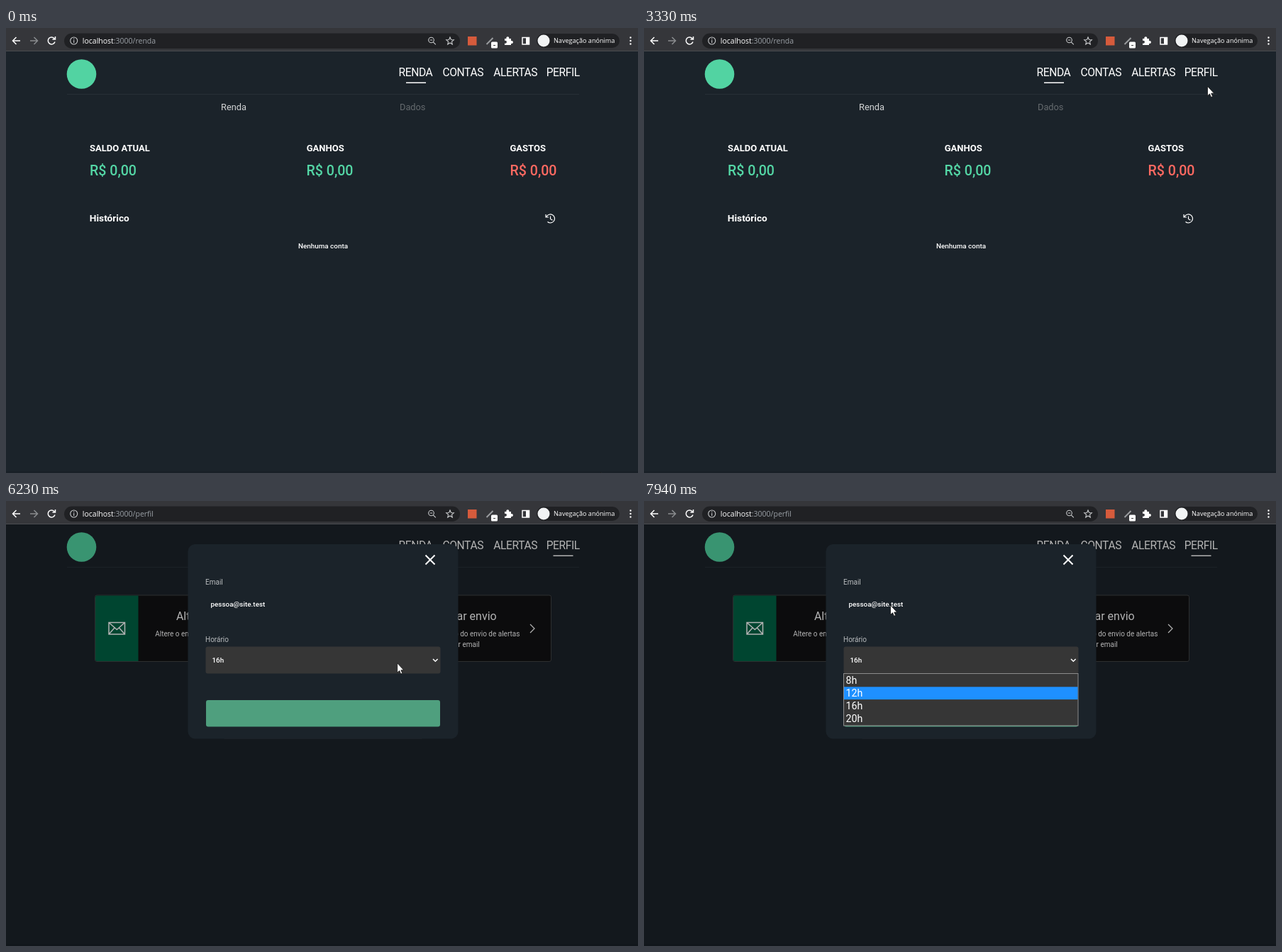
An HTML page that plays this animation: 891x628 px, repeating every 8 s.

```html
<!DOCTYPE html>
<html lang="pt">
<head>
<meta charset="utf-8">
<style>
html, body { margin: 0; width: 100%; height: 100%; overflow: hidden; background: #1b232a; }
svg { display: block; width: 891px; height: 628px; font-family: Roboto, sans-serif; fill: #fff; }
text { white-space: pre; }
.ui { font-family: "Open Sans", "Noto Sans", sans-serif; }
.nav { font-size: 15.6px; letter-spacing: -.4px; }
.label { font-size: 13px; font-weight: 700; }
.money { font-size: 19.6px; font-weight: 500; fill: #54d6a5; }
.small { font-size: 10px; }
.firm { font-weight: 500; font-size: 9.9px; }
.mid { text-anchor: middle; }
.line { fill: none; stroke: #fff; stroke-width: 1.5; }
</style>
</head>
<body>
<svg viewBox="0 0 891 628">
  <defs>
    <path id="chevron" class="line" d="M0 0l6 6-6 6" style="stroke-width:1.2"/>
    <g id="card">
      <rect x=".5" y=".5" width="282" height="93.500" rx="2.500" fill="#111113" stroke="#414345"/>
      <path d="M1 3q0-2 2-2H61.500V93.500H3q-2 0-2-2Z" fill="#006245"/>
      <use href="#chevron" x="253" y="41.500"/>
    </g>
  </defs>

  <rect width="891" height="628" fill="#1b232a"/>
  <rect y="625" width="891" height="3" fill="#192027"/>

  <!-- site header -->
  <circle cx="106.500" cy="65" r="20.800" fill="#52d3a2"/>
  <path d="M86 93.500H808" stroke="#272f36"/>
  <g class="nav">
    <text x="553.500" y="67.700">RENDA</text>
    <text x="615.500" y="67.700">CONTAS</text>
    <text x="687.300" y="67.700">ALERTAS</text>
    <text x="761.700" y="67.700">PERFIL</text>
  </g>
  <rect id="underline" y="76.500" width="28" height="1.500"/>

  <g id="income">
    <g font-size="12.800">
      <text x="303" y="115.500" fill="#d3d5d6">Renda</text>
      <text x="555" y="115.500" fill="#656a6e">Dados</text>
    </g>
    <g class="label">
      <text x="118" y="174.300">SALDO ATUAL</text>
      <text x="423.700" y="174.300">GANHOS</text>
      <text x="710.500" y="174.300">GASTOS</text>
      <text x="117.800" y="273" font-size="13.700" style="font-size:13.700px">Histórico</text>
    </g>
    <g class="money">
      <text x="118" y="208">R$ 0,00</text>
      <text x="423.500" y="208">R$ 0,00</text>
      <text x="710.500" y="208" style="fill:#ff6961">R$ 0,00</text>
    </g>
    <path class="line" d="M762 266.500A6 6 0 1 1 763.500 273.500M761 263v4h4M767.500 265.500v4l3 1.800" style="stroke-width:1.2"/>
    <text class="firm mid" x="447" y="310.500">Nenhuma conta</text>
  </g>

  <g id="profile">
    <use href="#card" x="125" y="132.500"/>
    <use href="#card" x="486" y="132.500"/>
    <use href="#card" x="305.500" y="241"/>
    <g class="mid" font-size="16">
      <text x="285" y="167.500">Alterar email</text>
      <text x="647" y="167.500">Alterar envio</text>
      <text x="466" y="276">Alterar senha</text>
    </g>
    <g class="small mid">
      <text x="285.500" y="190.500">Altere o endereço de email da sua</text>
      <text x="285.500" y="206">conta</text>
      <text x="647" y="190.500">Altere o horário do envio de alertas</text>
      <text x="647" y="206">por email</text>
      <text x="466" y="299.500">Altere a senha da sua conta</text>
    </g>
    <g class="line">
      <path d="M145 171.500H167.500V188H145ZL156.300 181.500 167.500 171.500M145 188L153 179M167.500 188L159.500 179"/>
      <circle cx="517.500" cy="180" r="8"/>
      <path d="M513 173l1-5h7l1 5M513 187l1 5h7l1-5M517.500 175v5h4"/>
      <path d="M327.500 283.500H347.500V298.500H327.500ZM332.500 283.500v-3a5 5 0 0 1 10 0v3"/>
    </g>
  </g>

  <g id="modal">
    <rect y="33" width="891" height="595" fill="#000" opacity=".3"/>
    <rect x="256.500" y="61" width="381" height="274.500" rx="10" fill="#1b232a"/>
    <path class="line" d="M591.500 76.500l13 13m0-13l-13 13" style="stroke-width:2"/>
    <g class="small">
      <text x="281" y="117.500" fill="#b9bcbe">Email</text>
      <text x="281" y="198.500" fill="#b9bcbe">Horário</text>
      <text class="firm" x="288.500" y="148.500">pessoa@site.test</text>
    </g>
    <rect x="282" y="281" width="330" height="37.500" rx="3" fill="#4f9f7e"/>
    <rect x="281.500" y="205.500" width="331" height="38" rx="3" fill="#363636"/>
    <text class="firm" x="290.500" y="228">16h</text>
    <path class="line" d="M602 223l3.300 3.300 3.300-3.300"/>
    <g id="menu">
      <rect x="281.500" y="243.500" width="330.500" height="73.500" fill="#363636" stroke="#8c8c8c"/>
      <rect id="choice" x="282" width="329.500" height="17.800" fill="#1e90ff"/>
      <g font-size="14.200">
        <text x="284.500" y="258">8h</text>
        <text x="284.500" y="276">12h</text>
        <text x="284.500" y="293.500">16h</text>
        <text x="284.500" y="311.500">20h</text>
      </g>
    </g>
  </g>

  <!-- browser bar -->
  <g class="ui">
    <rect width="891" height="33" fill="#35363a"/>
    <rect y="32" width="891" height="1" fill="#4a4c50"/>
    <rect x="82" y="7.500" width="558" height="21.500" rx="10.700" fill="#202124"/>
    <rect x="748" y="8" width="117" height="20" rx="10" fill="#202124"/>
    <path class="line" d="M20 18H9.500m5-5l-5 5 5 5"/>
    <path class="line" d="M34 18H44.500m-5-5l5 5-5 5" style="stroke:#8a8c8f"/>
    <path class="line" d="M68.300 15A5 5 0 1 0 69 19.500M69.500 12v4h-4"/>
    <g class="line" style="stroke:#c8cacc;stroke-width:1.1">
      <circle cx="95.700" cy="18" r="5"/>
      <path d="M95.700 17v4M95.700 14.700v1.200"/>
      <circle cx="599.500" cy="17" r="3.800"/>
      <path d="M602.300 19.800l3.500 3.500M597.800 17h3.400"/>
      <path d="M626 13l1.500 3.500 3.800.3-2.900 2.500.9 3.700-3.300-2-3.300 2 .9-3.700-2.900-2.500 3.800-.3Z"/>
    </g>
    <text x="107.800" y="22" font-size="10.500">localhost<tspan id="path" fill="#9aa0a6"></tspan></text>
    <rect x="651" y="12" width="12.500" height="12.500" fill="#d65b3c"/>
    <path d="M677.500 23l9-9" stroke="#9a9c9f" stroke-width="2"/>
    <rect x="684" y="19.500" width="9" height="9" rx="1.500"/>
    <rect x="687" y="24" width="3" height="1" fill="#444"/>
    <path d="M703 15h2.500a2 2 0 1 1 3.600 0H712v3.200a2 2 0 1 1 0 3.600V24H703v-2.500a2 2 0 1 0 0-3.600Z"/>
    <path class="line" d="M728 13.500h9.500v9.500H728Z"/>
    <rect x="733" y="13" width="5" height="10"/>
    <circle cx="758" cy="18" r="8.500" fill="#f1f3f4"/>
    <text x="772" y="21.300" font-size="9.100">Navegação anónima</text>
    <path d="M880.500 13.500v9.100" stroke="#fff" stroke-width="2.400" stroke-linecap="round" stroke-dasharray="0 4.500"/>
  </g>

  <g id="status" class="ui">
    <rect y="617" width="88" height="11" fill="#22282d"/>
    <text x=".5" y="626" font-size="8.800" fill="#d5d7d9">localhost:3000/perfil</text>
  </g>

  <g id="pointer" stroke="#111" stroke-width=".8" stroke-linejoin="round">
    <path id="arrow" d="M.5 0V13.500L3.500 10.700 5.500 15.300 7.700 14.400 5.700 10H9.700Z"/>
    <path id="hand" d="M-1.300 .8Q0-1 1.300 .8V6l5.500 1.300Q8 8 7.700 10L6.300 16H-.5L-4.500 10.500Q-4.500 8.500-2.800 9L-1.300 10.500Z"/>
  </g>
</svg>
<script>
const LOOP = 8000, ORBIT = [1620, 3140];
const $ = id => document.getElementById(id);
const within = (t, a, b) => t >= a && t < b;

// places the pointer passes: time, x, y
const stops = [
  [0, 838, 627], [830, 299, 208], [1120, 311, 214], [1400, 520, 126], [1620, 710, 230],
  [3140, 674, 314], [3330, 794, 83], [3470, 787, 62], [3670, 787, 62],
  [4220, 579, 263], [4650, 430, 329], [4950, 230, 235], [5240, 290, 146],
  [5650, 583, 146], [5850, 742, 180], [6080, 600, 222], [6980, 356, 248],
  [7200, 325, 301], [7450, 264, 235], [7620, 292, 76], [7940, 347, 147], [LOOP, 347, 147]
];

// slope at a stop; flat at turning points so the path never overshoots
function slope(i, c) {
  const a = stops[i - 1], b = stops[i], d = stops[i + 1];
  if (!a || !d || (b[c] - a[c]) * (d[c] - b[c]) <= 0) return 0;
  return (d[c] - a[c]) / (d[0] - a[0]);
}

function glide(t, c) {
  const i = stops.findIndex(s => s[0] > t) - 1;
  const a = stops[i], b = stops[i + 1], h = b[0] - a[0], u = (t - a[0]) / h, v = 1 - u;
  return a[c] * v * v * (1 + 2 * u) + b[c] * u * u * (3 - 2 * u)
    + h * u * v * (slope(i, c) * v - slope(i + 1, c) * u);
}

// one quickening clockwise round over the page, otherwise a glide between stops
function pointer(t) {
  const [from, to] = ORBIT;
  if (!within(t, from, to)) return [glide(t, 1), glide(t, 2)];
  const angle = 390 * ((t - from) / (to - from)) ** 1.86 * Math.PI / 180;
  return [440 + 270 * Math.cos(angle), 230 + 169 * Math.sin(angle)];
}

// menu row under the pointer; keeps the last one after it leaves
function menuRow(t, y) {
  if (t < 7000) return 2;
  if (t > 7350) return 1;
  return Math.max(0, Math.min(3, Math.floor((y - 244) / 18)));
}

function show(id, on) {
  $(id).style.display = on ? "" : "none";
}

function draw(t) {
  const profile = t >= 3740;
  const hand = within(t, 3420, 4350) || within(t, 5790, 5960);
  const [x, y] = pointer(t);
  show("income", !profile);
  show("profile", profile);
  show("modal", t >= 5900);
  show("menu", t >= 6350);
  show("status", within(t, 3670, 4430));
  show("hand", hand);
  show("arrow", !hand);
  $("path").textContent = ":3000/" + (profile ? "perfil" : "renda");
  $("underline").setAttribute("x", profile ? 771.5 : 564);
  $("choice").setAttribute("y", 244.5 + menuRow(t, y) * 17.8);
  $("pointer").setAttribute("transform", `translate(${x} ${y})`);
}

const start = performance.now();
function tick() {
  draw((performance.now() - start) % LOOP);
  requestAnimationFrame(tick);
}
tick();
</script>
</body>
</html>
```
